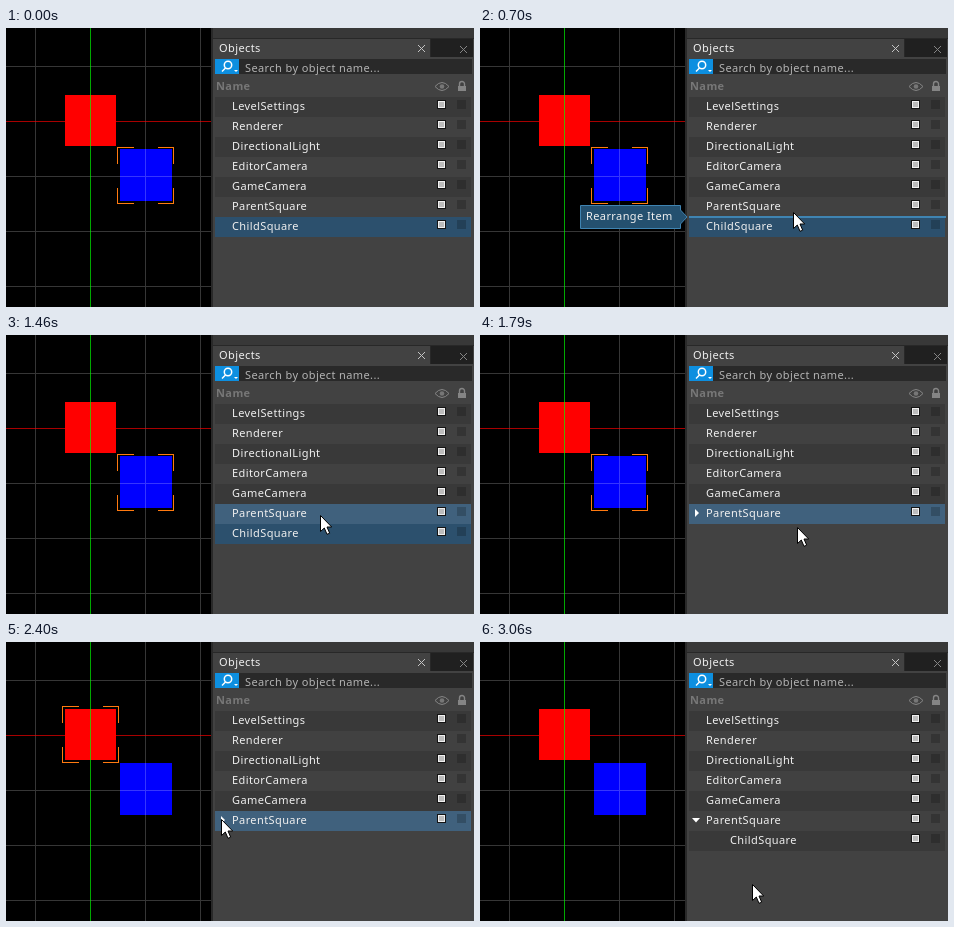
These frames come from a looping animation (468 px wide and 279 px high, 4.18 s). An HTML page:

```html
<!DOCTYPE html>
<html lang="en">
<head>
<meta charset="utf-8">
<title>Parenting objects</title>
<style>
  html, body { margin: 0; width: 100%; height: 100%; overflow: hidden; background: #000; }
  svg { display: block; width: 468px; height: 279px; font: 11px "Noto Sans", sans-serif; letter-spacing: .4px; }
  text { fill: #f0f0f0; white-space: pre; }
  rect, .crisp { shape-rendering: crispEdges; }
  .grid { stroke: #fff; stroke-opacity: .21; fill: none; }
  .axis { stroke-opacity: .66; }
  .bracket { fill: none; stroke: #ff7a10; }
  .dim { fill: #777; }
  .tip { fill: #24506f; stroke: #3f84b2; }
</style>
</head>
<body>
<svg viewBox="0 0 468 279">
  <rect width="468" height="279"/>
  <rect x="59" y="67" width="51" height="51" fill="#f00"/>
  <rect x="114" y="121" width="52" height="52" fill="#00f"/>
  <path class="grid crisp" d="M29.5 0V279M139.5 0V279M194.5 0V279M0 38.5H205M0 148.5H205M0 203.5H205M0 258.5H205"/>
  <path class="axis crisp" stroke="#f00" d="M0 93.5H205"/>
  <path class="axis crisp" stroke="#0f0" d="M84.5 0V279"/>
  <path id="childBracket" class="bracket crisp"/>
  <path id="parentBracket" class="bracket crisp"/>

  <rect x="205" width="263" height="279" fill="#424242"/>
  <rect x="205" width="2" height="279" fill="#292929"/>
  <rect x="207" width="261" height="10" fill="#383838"/>
  <rect x="207" y="10" width="261" height="1" fill="#282828"/>
  <rect x="425" y="11" width="42" height="18" fill="#202020"/>
  <rect x="424" y="11" width="1" height="18" fill="#282828"/>
  <text x="213" y="24">Objects</text>
  <path stroke="#c4c4c4" d="M412 17l7 7m0-7l-7 7"/>
  <path stroke="#858585" d="M454 18l7 7m0-7l-7 7"/>

  <rect x="209" y="31" width="257" height="15" fill="#292929"/>
  <rect x="209" y="31" width="24" height="15" fill="#0d8fe0"/>
  <g fill="none" stroke="#fff" stroke-width="1.5">
    <circle cx="222" cy="37" r="3.7"/>
    <path d="M219.500 40l-3.500 3.500"/>
  </g>
  <path fill="#fff" d="M228 42h4l-2 2z"/>
  <text x="239" y="44" style="fill:#b4b4b4">Search by object name...</text>

  <text x="210" y="62" class="dim" font-weight="bold">Name</text>
  <path fill="none" stroke="#858585" d="M429 58.500q7-8 14 0q-7 8-14 0z"/>
  <circle cx="436" cy="58.500" r="2.300" class="dim"/>
  <rect x="452" y="58" width="8" height="5" fill="#858585"/>
  <path fill="none" stroke="#858585" stroke-width="1.400" d="M453.500 58v-2a2.500 2.500 0 0 1 5 0V58"/>

  <g id="rows"></g>
  <path id="closed" fill="#fff" d="M215 174l4 4l-4 4z"/>
  <path id="open" fill="#fff" d="M212 176h8l-4 4.500z"/>
  <rect id="marker" x="209" y="188" width="257" height="2" fill="#3f84b2"/>

  <g id="reorderTip">
    <path class="tip" d="M100.500 177.500H200.500V182L207 189L200.500 196V200.500H100.500z"/>
    <text x="106" y="192">Rearrange Item</text>
  </g>
  <g id="moveTip">
    <path class="tip" d="M130.500 167.500H200.500V172L207 179L200.500 186V190.500H130.500z"/>
    <text x="136" y="182">Move Item</text>
  </g>
  <path id="cursor" fill="#fff" stroke="#000" d="M.5 .5V16.500L4.300 13L7 19.300L9.700 18.200L7 12H11.700z"/>
</svg>
<script>
  const LOOP = 4180, STEP = 30, ROW_TOP = 69, ROW_HEIGHT = 20;
  const PARENT = 5, CHILD = 6;
  const names = ["LevelSettings", "Renderer", "DirectionalLight", "EditorCamera",
    "GameCamera", "ParentSquare", "ChildSquare"];
  const SELECTED = "#2c506d", HOVER = "#40617d";

  // Pointer waypoints: time, x, y
  const path = [
    [170, 300, 252], [440, 309, 201], [580, 309, 201], [610, 310, 199],
    [700, 313, 184], [870, 313, 184], [1060, 314, 180], [1760, 314, 180],
    [1790, 317, 192], [1850, 308, 194], [2060, 246, 180], [2300, 215, 177],
    [2490, 215, 177], [2620, 240, 211], [2860, 272, 242]
  ];

  const $ = id => document.getElementById(id);
  const show = (node, on) => node.setAttribute("visibility", on ? "visible" : "hidden");
  const within = (t, from, to) => t >= from && t < to;

  function add(parent, tag, attrs) {
    const node = document.createElementNS("http://www.w3.org/2000/svg", tag);
    for (const key in attrs) node.setAttribute(key, attrs[key]);
    return parent.appendChild(node);
  }

  function corners(x, y, w, h, arm) {
    return [[x, y, 1, 1], [x + w, y, -1, 1], [x, y + h, 1, -1], [x + w, y + h, -1, -1]]
      .map(([cx, cy, sx, sy]) => `M${cx + sx * arm} ${cy}H${cx}V${cy + sy * arm}`).join("");
  }

  const rows = names.map((name, i) => {
    const y = ROW_TOP + i * ROW_HEIGHT;
    const group = add($("rows"), "g", {});
    const back = add(group, "rect", { x: 209, y, width: 256, height: ROW_HEIGHT });
    const label = add(group, "text", { x: 226, y: y + 13 });
    label.textContent = name;
    const box = (x, inset, fill) => add(group, "rect",
      { x: x + inset, y: y + 3 + inset, width: 9 - 2 * inset, height: 9 - 2 * inset, fill });
    box(431, 0, "#151515");
    box(431, 1, "#f0f0f0");
    box(431, 2, "#bcbcbc");
    box(451, 0, "rgba(0, 0, 0, .2)");
    return { group, back, label, base: i % 2 ? "#414141" : "#393939" };
  });

  $("childBracket").setAttribute("d", corners(111.5, 119.5, 56, 56, 16));
  $("parentBracket").setAttribute("d", corners(56.5, 64.5, 56, 56, 16));

  function pointer(t) {
    if (t < path[0][0]) return null;
    const next = path.findIndex(p => p[0] > t);
    if (next < 0) return path[path.length - 1].slice(1);
    const [t0, x0, y0] = path[next - 1], [t1, x1, y1] = path[next];
    const k = Math.floor((t - t0) / STEP) * STEP / (t1 - t0);
    return [Math.round(x0 + (x1 - x0) * k), Math.round(y0 + (y1 - y0) * k)];
  }

  function hoveredRow(t) {
    const at = pointer(t - STEP); // the list reacts one step late
    if (!at || within(t, 640, 930)) return -1;
    return Math.floor((at[1] - ROW_TOP) / ROW_HEIGHT);
  }

  function draw(t) {
    const hover = hoveredRow(t);
    const selected = t < 1490 ? CHILD : within(t, 2400, 3030) ? PARENT : -1;
    rows.forEach((row, i) => row.back.setAttribute("fill",
      i === hover ? HOVER : i === selected ? SELECTED : row.base));
    show(rows[CHILD].group, !within(t, 1490, 2430));
    rows[CHILD].label.setAttribute("x", t < 1490 ? 226 : 250);
    show($("closed"), within(t, 1490, 2430));
    show($("open"), t >= 2430);

    show($("childBracket"), t < 2400);
    show($("parentBracket"), within(t, 2400, 3060));
    show($("marker"), within(t, 670, 930));
    show($("reorderTip"), within(t, 670, 930));
    show($("moveTip"), within(t, 930, 1460));

    const at = pointer(t);
    show($("cursor"), at);
    if (at) $("cursor").setAttribute("transform", `translate(${at})`);
  }

  const start = performance.now();
  function tick() {
    draw((performance.now() - start) % LOOP);
    requestAnimationFrame(tick);
  }
  tick();
</script>
</body>
</html>
```
